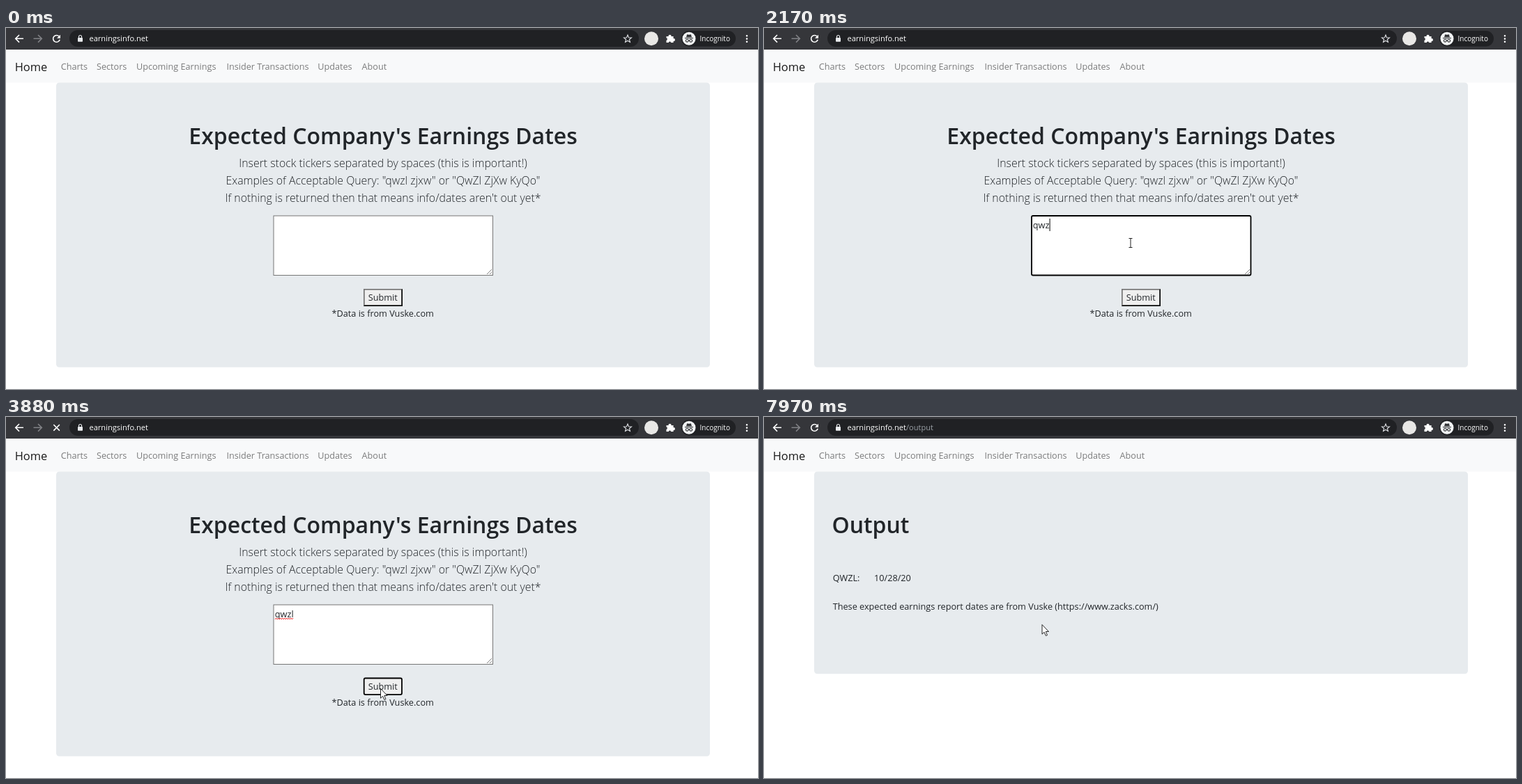
Write an HTML page that moves like this. It is 1079 px wide and 519 px high and loops after 8000 ms.

```html
<!DOCTYPE html>
<html lang="en">
<head>
<meta charset="utf-8">
<title>Expected Earnings Dates</title>
<style>
  html, body { margin: 0; width: 100%; height: 100%; overflow: hidden; background: #fff; }
  svg { display: block; width: 1079px; height: 519px; }
  text { font: 12.7px "Open Sans", "Noto Sans", sans-serif; fill: #212529; white-space: pre; }
  .mid { text-anchor: middle; }
  .bar text { font-size: 11.07px; fill: #fff; }
  .bar .badge { font-size: 10px; }
  .bar .path { fill: #9aa0a6; }
  .nav text { font-size: 12.65px; fill: rgba(0, 0, 0, .5); }
  .nav .brand { font-size: 16.4px; fill: rgba(0, 0, 0, .9); }
  .title { font-size: 32px; font-weight: 600; }
  .lead text { font-size: 15.85px; font-weight: 300; }
  .line { fill: none; stroke: #fff; stroke-width: 1.6; }
  #glow { fill: #ffff60; mix-blend-mode: multiply; }
</style>
</head>
<body>
<svg viewBox="0 0 1079 519">
  <!-- Browser toolbar -->
  <g class="bar">
    <rect width="1079" height="31" fill="#35363a"/>
    <rect x="91" y="3" width="817" height="24" rx="12" fill="#202124"/>
    <rect x="969" y="4" width="78" height="22.5" rx="11.2" fill="#202124"/>
    <path class="line" d="M25 15.3H14M19 10l-5.3 5.3L19 20.6"/>
    <path class="line" style="stroke:#808185" d="M39.500 15.300H51M46 10l5.300 5.300L46 20.600"/>
    <g id="reload">
      <path class="line" d="M76.300 12.200A4.900 4.900 0 1 0 77.200 16.800"/>
      <path fill="#fff" d="M78 9.700v5h-5z"/>
    </g>
    <path id="stop" class="line" d="M68.300 11l8.600 8.600M76.900 11l-8.600 8.600"/>
    <rect x="103" y="14" width="7" height="5.800" rx=".8" fill="#e8eaed"/>
    <path class="line" style="stroke:#e8eaed;stroke-width:1.200" d="M104.500 14v-1.500a2 2 0 0 1 4 0V14"/>
    <text x="119.500" y="19.300">earningsinfo.net<tspan id="path" class="path">/output</tspan></text>
    <path id="star" class="line" style="stroke:#dfe1e5;stroke-width:1.100"/>
    <circle cx="926" cy="15.300" r="10" fill="#e9e8e6"/>
    <path fill="#fff" d="M947.500 12h3.200a1.900 1.900 0 1 1 3.700 0h3.200v3.200a1.900 1.900 0 1 1 0 3.700V21h-3.400a1.800 1.800 0 0 0-3.500 0h-3.200v-3.300a1.800 1.800 0 0 0 0-3.500z"/>
    <circle cx="980" cy="15.300" r="9.500" fill="#f1f3f4"/>
    <path fill="#303134" d="M974 14h12v1.100h-12zM976 13.200l1.200-4 2.800.6 2.800-.6 1.200 4z"/>
    <path class="line" style="stroke:#303134;stroke-width:1.100" d="M979.200 18.200a1.900 1.900 0 1 0-3.800 0a1.900 1.900 0 1 0 3.800 0q.8-.7 1.600 0a1.900 1.900 0 1 0 3.800 0a1.900 1.900 0 1 0-3.800 0"/>
    <text class="badge" x="995.500" y="19">Incognito</text>
    <path stroke="#fff" stroke-width="2.600" stroke-linecap="round" d="M1063 11.200h0M1063 15.500h0M1063 19.800h0"/>
  </g>

  <g class="nav">
    <rect y="31" width="1079" height="47.500" fill="#f8f9fa"/>
    <text class="brand" x="12.700" y="61.500">Home</text>
    <text x="78.700" y="60.200">Charts</text>
    <text x="130" y="60.200">Sectors</text>
    <text x="187" y="60.200">Upcoming Earnings</text>
    <text x="316.500" y="60.200">Insider Transactions</text>
    <text x="447.200" y="60.200">Updates</text>
    <text x="510.500" y="60.200">About</text>
  </g>

  <rect id="panel" x="72" y="78.500" width="938" rx="4.500" fill="#e7ebee"/>

  <g id="formPage">
    <text class="title mid" x="541" y="167">Expected Company's Earnings Dates</text>
    <g class="lead mid">
      <text x="541" y="199.700">Insert stock tickers separated by spaces (this is important!)</text>
      <text x="541" y="225">Examples of Acceptable Query: "qwzl zjxw" or "QwZl ZjXw KyQo"</text>
      <text x="541" y="250.400">If nothing is returned then that means info/dates aren't out yet*</text>
    </g>
    <rect id="box" x="384" y="270" width="314.500" height="85.500" fill="#fff"/>
    <path stroke="#777" stroke-width=".9" d="M690 354l7-7M694 354l3-3"/>
    <text id="typed" x="385.800" y="287.600"></text>
    <rect id="caret" y="274" width="1" height="18" fill="#000"/>
    <path id="squiggle" fill="none" stroke="#f03030" stroke-width="1"/>
    <g id="plainButton">
      <rect x="513" y="375" width="56" height="25" fill="#000"/>
      <path fill="#767676" d="M513 400V375h56l-2 2h-52v21z"/>
      <rect x="514.700" y="376.700" width="52.600" height="21.600" fill="#efefef"/>
    </g>
    <rect id="focusButton" x="513.700" y="375.500" width="54.300" height="23.600" rx="2" fill="#efefef" stroke="#000" stroke-width="1.800"/>
    <text class="mid" x="540.700" y="392.400">Submit</text>
    <text class="mid" x="540.700" y="415.200">*Data is from Vuske.com</text>
  </g>

  <g id="outputPage">
    <text class="title" x="97.500" y="167">Output</text>
    <text x="98.700" y="236">QWZL:</text>
    <text x="158" y="236">10/28/20</text>
    <text x="98.700" y="276.800">These expected earnings report dates are from Vuske (https://www.zacks.com/)</text>
  </g>

  <circle id="glow" r="10"/>
  <g id="pointer">
    <path id="arrow" fill="#fff" stroke="#111" stroke-width=".9" d="M.500.500V14.200L3.600 11.300 5.900 16.500 8 15.600 5.800 10.500H10z"/>
    <path id="beam" fill="none" stroke="#222" stroke-width="1" d="M-2.500-6.500H2.500M0-6.500V6.500M-2.500 6.500H2.500"/>
  </g>
</svg>
<script>
const LOOP = 8000, FRAME = 50, BLINK = 530;
const FOCUS = 1010, RELEASE = 1090, CLICK = 3750, LOADING = 3880, ADDRESS = 6980, RESULT = 7220;
const WORD = "qwzl", KEY_TIMES = [2000, 2085, 2170, 2400];
// Pointer moves as [time, x, y] waypoints
const MOVES = [
  [[130, 1000, 520], [330, 815, 438], [580, 610, 345], [840, 526, 309]],
  [[2930, 526, 309], [3320, 536, 360], [3720, 537, 390]],
  [[7730, 537, 390], [7970, 398.500, 298]]
];

const el = Object.fromEntries([...document.querySelectorAll("[id]")].map(e => [e.id, e]));
const show = (node, on) => { node.style.display = on ? "" : "none"; };
const set = (node, attrs) => { for (const key in attrs) node.setAttribute(key, attrs[key]); };
const within = (t, from, to) => t >= from && t < to;

const starPoint = (_, i) => {
  const r = i % 2 ? 2.500 : 5.800, a = i * Math.PI / 5;
  return [892 + r * Math.sin(a), 15.700 - r * Math.cos(a)];
};
set(el.star, { d: "M" + Array.from({ length: 10 }, starPoint).join("L") + "Z" });
set(el.squiggle, { d: "M" + Array.from({ length: 18 }, (_, i) => [386 + i * 1.530, i % 2 ? 289 : 291]).join("L") });

function pointerAt(t) {
  const move = MOVES.findLast(m => t >= m[0][0]);
  if (!move) return null;
  const start = move[0][0], end = move[move.length - 1];
  const time = start + (Math.floor((t - start) / FRAME) + 1) * FRAME;
  const next = move.findIndex(k => k[0] > time);
  if (next < 0) return end.slice(1);
  const [a, b] = [move[next - 1], move[next]];
  const p = (time - a[0]) / (b[0] - a[0]);
  return [1, 2].map(i => a[i] + (b[i] - a[i]) * p);
}

function drawPointer(t) {
  const pos = pointerAt(t), clicking = within(t, FOCUS, RELEASE) || within(t, CLICK, LOADING);
  show(el.pointer, pos);
  show(el.glow, pos && clicking);
  if (!pos) return;
  const [x, y] = pos;
  const overBox = t < RESULT && within(x, 384, 699) && within(y, 270, 356);
  show(el.beam, overBox);
  show(el.arrow, !overBox);
  set(el.pointer, { transform: `translate(${x} ${y})` });
  set(el.glow, { cx: x - .500, cy: y });
}

function draw(t) {
  const done = t >= RESULT, focused = within(t, FOCUS, CLICK), sent = t >= CLICK;
  const loading = within(t, LOADING, RESULT);
  show(el.reload, !loading);
  show(el.stop, loading);
  show(el.path, t >= ADDRESS);
  show(el.formPage, !done);
  show(el.outputPage, done);
  set(el.panel, { height: done ? 290.700 : 409.200 });

  set(el.box, focused
    ? { stroke: "#000", "stroke-width": 1.800, rx: 2 }
    : { stroke: "#767676", "stroke-width": 1, rx: 0 });
  show(el.plainButton, !sent);
  show(el.focusButton, sent);
  show(el.squiggle, sent);

  const count = KEY_TIMES.filter(k => t >= k).length;
  const text = WORD.slice(0, count);
  if (el.typed.textContent !== text) el.typed.textContent = text;
  const since = t - (count ? KEY_TIMES[count - 1] : FOCUS + 30);
  show(el.caret, focused && Math.floor(Math.max(0, since) / BLINK) % 2 === 0);
  set(el.caret, { x: 386 + (count && !done ? el.typed.getComputedTextLength() : 0) });

  drawPointer(t);
}

const begin = performance.now();
function tick() {
  draw((performance.now() - begin) % LOOP);
  requestAnimationFrame(tick);
}
tick();
</script>
</body>
</html>
```
